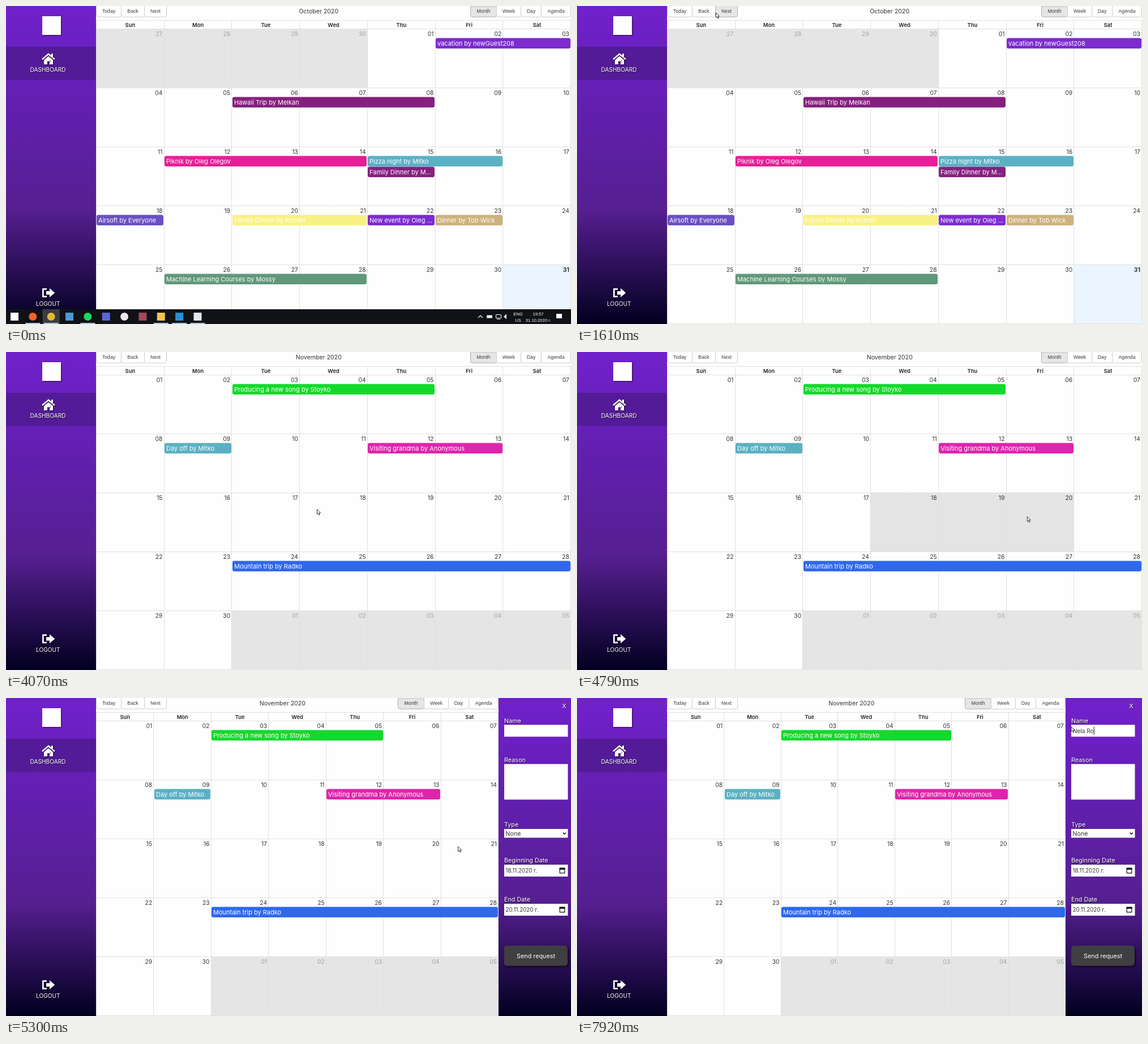
Animation of 998x561 px, one loop 7990 ms. Source, as an HTML page with a canvas:

```html
<!DOCTYPE html>
<html lang="en">
<head>
<meta charset="utf-8">
<title>Team calendar</title>
<style>
  html, body { margin: 0; width: 100%; height: 100%; overflow: hidden; background: #fff; }
  canvas { display: block; }
</style>
</head>
<body>
<canvas id="stage" width="998" height="561"></canvas>
<script>
const ctx = document.getElementById('stage').getContext('2d');
const W = 998, H = 561, LOOP = 7990, LEFT = 159.5, TOP = 40.5, ROW = 104, PANEL = 135;
const UI = 'Inter, sans-serif', SYS = '"Liberation Sans", sans-serif';

// Moments of the session, in ms
const PRESS_NEXT = 2290, NEXT_MONTH = 2420, BLUR = 4050, SELECT = 4130;
const OPENING = 4989, OPEN_MS = 440, FOCUS = 6820, TYPING = 7060, KEY_MS = 143;
const TYPED = 'Nela Ro';

const VIOLET = '#7d2ccf', PLUM = '#86207f', TEAL = '#5bb1c3';

// Each event: first day, number of days, colour, label
const OCTOBER = { title: 'October 2020', index: 9, events: [
  [2, 2, VIOLET, 'vacation by newGuest208'],
  [6, 3, PLUM, 'Hawaii Trip by Melkan'],
  [12, 3, '#e91e97', 'Piknik by Oleg Olegov'],
  [15, 2, TEAL, 'Pizza night by Mitko'],
  [15, 1, PLUM, 'Family Dinner by Melkan'],
  [18, 1, '#6a4fc4', 'Airsoft by Everyone'],
  [20, 2, '#f9f184', 'Family Dinner by Rumen'],
  [22, 1, VIOLET, 'New event by Oleg Olegov'],
  [23, 1, '#cdb27c', 'Dinner by Tob Wick'],
  [26, 3, '#5f987a', 'Machine Learning Courses by Mossy']] };
const NOVEMBER = { title: 'November 2020', index: 10, events: [
  [3, 3, '#14d92c', 'Producing a new song by Stoyko'],
  [9, 1, TEAL, 'Day off by Mitko'],
  [12, 2, '#de25ad', 'Visiting grandma by Anonymous'],
  [24, 5, '#2f68ec', 'Mountain trip by Radko']] };
const TODAY = +new Date(2020, 9, 31);

// Pointer path: time, x, y
const PATH = [
  [460, 984, 300], [1230, 414, 116], [1610, 245, 11.5], [1730, 238, 10], [2060, 246, 8],
  [2610, 246, 8], [3700, 549, 277], [4100, 549, 277], [4800, 798, 290], [5130, 798, 290],
  [5300, 798, 262], [5810, 869, 98], [6610, 872.5, 50]
];

function box(x, y, w, h, fill, r = 0) {
  ctx.fillStyle = fill;
  ctx.beginPath();
  ctx.roundRect(x, y, w, h, r);
  ctx.fill();
}

function frame(x, y, w, h, color, width = 1, r = 0) {
  ctx.strokeStyle = color;
  ctx.lineWidth = width;
  ctx.beginPath();
  ctx.roundRect(x, y, w, h, r);
  ctx.stroke();
}

function text(s, x, y, size, color, align = 'left', weight = 400, family = UI) {
  ctx.font = `${weight} ${size}px ${family}`;
  ctx.textAlign = align;
  ctx.fillStyle = color;
  ctx.fillText(s, x, y);
}

function poly(points, fill) {
  ctx.fillStyle = fill;
  ctx.beginPath();
  points.forEach(p => ctx.lineTo(...p));
  ctx.fill();
}

function line(points, color, width = 1, close = false) {
  ctx.beginPath();
  points.forEach(p => ctx.lineTo(...p));
  if (close) ctx.closePath();
  ctx.strokeStyle = color;
  ctx.lineWidth = width;
  ctx.stroke();
}

function shadowed(draw, offset = 1) {
  ctx.save();
  ctx.shadowColor = '#000a';
  ctx.shadowOffsetX = ctx.shadowOffsetY = offset;
  ctx.shadowBlur = offset + 1;
  draw();
  ctx.restore();
}

// CSS "ease": cubic-bezier(.25, .1, .25, 1)
function ease(p) {
  if (p <= 0 || p >= 1) return Math.min(1, Math.max(0, p));
  const bezier = (a, b, u) => 3 * a * u * (1 - u) ** 2 + 3 * b * u * u * (1 - u) + u ** 3;
  let lo = 0, hi = 1;
  for (let i = 0; i < 24; i++) {
    const mid = (lo + hi) / 2;
    if (bezier(.25, .25, mid) < p) lo = mid; else hi = mid;
  }
  return bezier(.1, 1, lo);
}

function pointerAt(t) {
  const i = PATH.findIndex(k => k[0] > t);
  if (i < 0) return PATH[PATH.length - 1].slice(1);
  if (i === 0) return null;
  const [t0, x0, y0] = PATH[i - 1], [t1, x1, y1] = PATH[i];
  const p = (t - t0) / (t1 - t0);
  return [x0 + (x1 - x0) * p, y0 + (y1 - y0) * p];
}

const purple = ctx.createLinearGradient(0, 0, 0, H);
purple.addColorStop(0, '#7121cc');
purple.addColorStop(.25, '#651fb6');
purple.addColorStop(.64, '#561f91');
purple.addColorStop(1, '#020020');

function sidebar() {
  box(0, 0, 159, H, purple);
  box(0, 72, 159, 58.5, '#531b97');
  shadowed(() => {
    box(64, 18, 33, 33, '#fff');

    line([[64, 94], [75, 84.7], [86, 94]], '#fff', 2.6);
    poly([[67, 95.3], [75, 88.6], [83, 95.3]], '#fff');
    box(80, 84, 3, 6, '#fff');
    box(67, 95, 6, 8, '#fff');
    box(77, 95, 6, 8, '#fff');
    box(72, 94, 6, 3.5, '#fff');

    line([[72, 499.4], [65.4, 499.4], [65.4, 512.6], [72, 512.6]], '#fff', 2.7);
    box(71, 503, 7, 6.3, '#fff');
    poly([[77, 498], [86.3, 506], [77, 514]], '#fff');

    text('DASHBOARD', 74, 116, 10.2, '#fff', 'center');
    text('LOGOUT', 74.3, 528.7, 10.1, '#fff', 'center');
  });
}

// Draws a run of buttons; `states` maps a label to its state
function buttonGroup(labels, x, pointer, states) {
  for (const label of labels) {
    ctx.font = `8.7px ${SYS}`;
    const w = ctx.measureText(label).width + 21.2, left = Math.floor(x) + .5;
    const width = Math.floor(x + w) + .5 - left;
    const hover = pointer && pointer[1] < 19 && pointer[0] >= x && pointer[0] < x + w;
    const state = states[label] || hover;
    box(left, -6, width, 25.3, state ? '#e6e6e6' : '#fff', 3);
    frame(left, -6, width, 25.3, state ? '#adadad' : '#ccc', 1, 3);
    if (state === 'active') box(left, 0, width, 2, '#0001');
    if (state === 'focus') frame(left + .3, .3, width - .5, 18.6, '#111', 1.6, 2);
    text(label, left + width / 2, 12, 8.7, '#373a3c', 'center', 400, SYS);
    x += w;
  }
}

function toolbar(t, R, title, pointer) {
  const focused = t >= PRESS_NEXT && t < BLUR;
  buttonGroup(['Today', 'Back', 'Next'], LEFT, pointer, { Next: focused && 'focus' });
  buttonGroup(['Month', 'Week', 'Day', 'Agenda'], R - 177.3, pointer, { Month: 'active' });
  text(title, 552.3 + (R - W) / 2, 13.2, 10.6, '#333', 'center');
}

// Shortens a label to the given width
function fit(label, width) {
  ctx.font = `11px ${UI}`;
  if (ctx.measureText(label).width <= width) return label;
  while (ctx.measureText(label + '...').width > width) label = label.slice(0, -1);
  return label + '...';
}

function calendar(t, R, pointer) {
  const month = t < NEXT_MONTH ? OCTOBER : NOVEMBER;
  const offset = new Date(2020, month.index, 1).getDay();
  const cw = (R - LEFT - .3) / 7, colX = c => LEFT + c * cw;
  box(159, 0, R - 159, H, '#fefefe');
  toolbar(t, R, month.title, pointer);

  const cells = Array.from({ length: 35 }, (_, i) => {
    const date = new Date(2020, month.index, 1 - offset + i);
    return { c: i % 7, y: TOP + ROW * Math.floor(i / 7), day: date.getDate(),
      off: date.getMonth() !== month.index, today: +date === TODAY };
  });
  for (const { c, y, off, today } of cells)
    if (off || today) box(colX(c), y, cw + .3, ROW, off ? '#e5e5e5' : '#eaf5ff');

  // Drag selection in the third week, starting on Wednesday
  if (t >= SELECT && t < OPENING) {
    const last = Math.floor((pointer[0] - LEFT) / cw);
    box(colX(3), TOP + 2 * ROW, cw * (last - 2), ROW, '#0000001a');
  }

  for (let c = 0; c <= 7; c++) {
    const x = Math.floor(colX(c)) + .5;
    line([[x, 25.5], [x, H]], '#e0e0e0');
  }
  line([[159, 25.5], [R, 25.5]], '#e0e0e0');
  for (let y = TOP; y < H; y += ROW) line([[159, y], [R, y]], '#e0e0e0');

  ['Sun', 'Mon', 'Tue', 'Wed', 'Thu', 'Fri', 'Sat'].forEach((name, c) =>
    text(name, colX(c + .5), 36.5, 9.4, '#222', 'center', 600));
  for (const { c, y, off, today, day } of cells)
    text(String(day).padStart(2, '0'), colX(c + 1) - 2.8, y + 12.4, 10.3,
      off ? '#a3a3a3' : '#333', 'right', today ? 700 : 400);

  month.events.forEach(([day, span, color, label], i) => {
    const { c, y } = cells[day + offset - 1];
    const lane = month.events.slice(0, i).filter(e => e[0] === day).length;
    const x = Math.round(colX(c) + .8), right = Math.round(colX(c + span) - 1);
    const top = y + 16 + lane * 19;
    box(x, top, right - x, 18.5, color, 3.2);
    text(fit(label, right - x - 5), x + 3, top + 13.1, 11, '#fff');
  });
}

function dateField(x, y, value) {
  text(value, x + 2.5, y + 14.3, 9.8, '#333');
  frame(x + 98.2, y + 6.5, 8.6, 8.4, '#111', 1.2);
  box(x + 97.6, y + 5.4, 9.8, 3.4, '#111');
}

function panel(t, R) {
  const x = R + 10;
  box(R, 0, W - R, H, purple);
  const fields = [['Name', 47.3, 21], ['Reason', 116.5, 62.7], ['Type', 231, 15.5],
    ['Beginning Date', 294, 21], ['End Date', 363, 21]];
  for (const [label, y, h] of fields) {
    shadowed(() => text(label, x, y - 3.8, 10.8, '#fff'));
    box(x, y, 112.5, h, '#fff');
  }
  shadowed(() => text('X', R + 116, 17.8, 11, '#fff', 'center'));
  text('None', x + 2.3, 242.7, 10.8, '#333');
  line([[x + 103.8, 237.5], [x + 106.4, 240.2], [x + 109, 237.5]], '#111', 1.4);
  dateField(x, 294, '18.11.2020 г.');
  dateField(x, 363, '20.11.2020 г.');
  shadowed(() => box(x, 437, 112, 35.5, '#3f3f41', 5), 2);
  text('Send request', x + 56, 458.7, 10.8, '#fff', 'center');

  if (t >= FOCUS) {
    const typed = TYPED.slice(0, Math.max(0, Math.floor((t - TYPING) / KEY_MS) + 1));
    text(typed, x + 3, 61.6, 10, '#333');
    box(x + 3.3 + ctx.measureText(typed).width, 50.5, 1, 14.5, '#222');
  }
}

function taskbar() {
  const step = 32.35, white = '#fff';
  box(0, 535, W, 26, '#101216');
  // Colour, then "o" for round icons and "_" for running programs
  ['#fff', '#f0642c o_', '#e0b63a o_', '#4a9bd2', '#1ed760 o_', '#5b66d6', '#ece5ea o',
    '#a8465c', '#f2c34f _', '#268fd5 _', '#e4e8e6 _'].forEach((icon, i) => {
    const [color, flags = ''] = icon.split(' '), x = 15 + i * step;
    if (i === 2) box(x - 15, 535, 30, 26, '#3b3d40');
    if (flags.includes('_')) box(x - 13, 559, 26, 2, '#a9c7dc');
    box(x - 7, 541, 14, 14, color, flags.includes('o') ? 7 : 0);
  });

  line([[834, 550], [838, 546], [842, 550]], white, 1.1);
  box(849, 545.5, 10, 5, white, 1);
  frame(865.5, 544.5, 9, 6, white);
  box(867, 552, 6, 1, white);
  poly([[879, 548], [884, 543.5], [884, 552.5]], white);
  box(972, 543, 10, 8, white);
  const label = (s, x, y) => text(s, x, y, 7.7, white, 'center', 400, SYS);
  label('ENG', 904.5, 545.5);
  label('US', 904.5, 557);
  label('19:57', 940, 545.5);
  label('31.10.2020 г.', 940, 557);
}

function arrow([x, y]) {
  const shape = [[0, 0], [0, 8.6], [2, 6.9], [3.4, 10], [4.8, 9.4], [3.5, 6.4], [6, 6.2]]
    .map(([dx, dy]) => [x + .5 + dx, y + .5 + dy]);
  poly(shape, '#fff');
  line(shape, '#222', .9, true);
}

function draw(now) {
  const t = now % LOOP;
  const R = Math.round(W - PANEL * ease((t - OPENING) / OPEN_MS));
  const pointer = pointerAt(t);
  calendar(t, R, pointer);
  sidebar();
  if (R < W) panel(t, R);
  if (t < 20) taskbar();
  if (pointer) arrow(pointer);
}

const start = performance.now();
function tick() {
  draw(performance.now() - start);
  requestAnimationFrame(tick);
}
draw(0);
requestAnimationFrame(tick);
</script>
</body>
</html>
```
